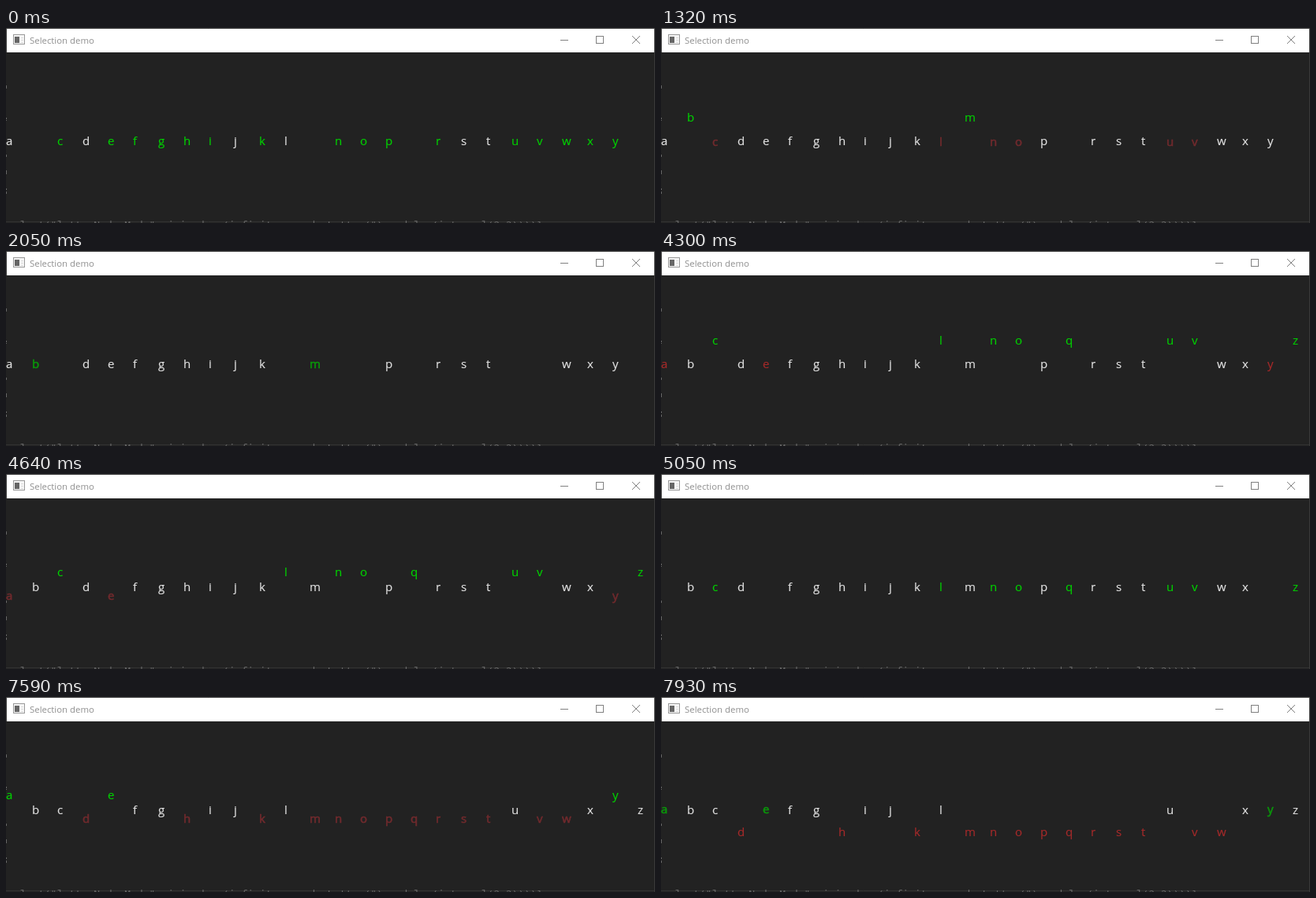
An HTML page for the animation above (7.99 s loop, 823x248 px).

```html
<!DOCTYPE html>
<html lang="en">
<head>
<meta charset="utf-8">
<title>Selection demo</title>
<style>
  html, body { margin: 0; width: 100%; height: 100%; overflow: hidden; background: #222; }
  svg { display: block; width: 823px; height: 248px; }
  text { white-space: pre; }
  #title { font: 11.4px "Open Sans", sans-serif; fill: #8f8f8f; }
  #letters { font: 15px "Open Sans", sans-serif; }
  #code { font: 13px "Noto Sans Mono", monospace; fill: #686868; }
</style>
</head>
<body>
<svg viewBox="0 0 823 248" xmlns="http://www.w3.org/2000/svg">
  <rect width="823" height="248" fill="#222"/>
  <path d="M0 246.5H823" stroke="#333"/>
  <text id="code" x="2" y="255">select("letterNode.Mode", joined = (infinite, randomLetter("), .delay(interval(2,3))))]</text>
  <path d="M.5 73v4M.5 114v2M.5 117v1M.5 161v3M.5 181v5M.5 204v2M.5 208v3" stroke="#666"/>
  <rect x="1" y="1" width="821" height="30" fill="#fff"/>
  <path d="M0 .5H823M.5 0V31M822.5 0V248" stroke="#3a3a3a"/>
  <g fill="none" stroke="#999">
    <rect x="9.5" y="8.5" width="14" height="12" fill="#f6f6f6"/>
    <path d="M19 12.5h3M19 15.5h3M19 18.5h3" stroke="#ddd"/>
    <rect x="11" y="11" width="6" height="8" fill="#666" stroke="none"/>
  </g>
  <text id="title" x="30" y="20">Selection demo</text>
  <g fill="none" stroke="#808080">
    <path d="M703 15.5h10"/>
    <rect x="748.5" y="10.5" width="9" height="9"/>
    <path d="M794 10l10 10M804 10l-10 10"/>
  </g>
  <g id="letters"></g>
</svg>
<script>
const LOOP = 7990, LEFT = 1, REST = 149, STEP = 32;
const ALPHABET = [..."abcdefghijklmnopqrstuvwxyz"];
const WHITE = "#e2e2e2", GREEN = "#00d000", BROWN = "#a52a2a";
const SOFT = { [GREEN]: "#0a960a", [BROWN]: "#702a2d" };

const first = { stay: "adjlst", fresh: "cefghiknopruvwxy" };
const updates = [
  { at: 1320, length: 730, enter: "bm", exit: "clnouv", stay: "adefghijkprstwxy", shift: 0.5, settle: -0.5 },
  { at: 4300, length: 750, enter: "clnoquvz", exit: "aey", stay: "bdfghijkmprstwx", shift: 0, settle: 0 },
  { at: 7250, length: 750, enter: "aey", exit: "dhkmnopqrstvw", stay: "bcfgijluxz", shift: 0, settle: -0.5 }
];

const group = document.getElementById("letters");
const nodes = ALPHABET.map((ch, i) => {
  const node = document.createElementNS("http://www.w3.org/2000/svg", "text");
  node.textContent = ch;
  node.setAttribute("x", LEFT + i * STEP - (i ? 0 : 1));
  return group.appendChild(node);
});

const ease = p => p < 0.5 ? 4 * p ** 3 : 1 - 4 * (1 - p) ** 3;

// A letter resting between two pixel rows looks heavier and dimmer.
function place(node, fill, dy) {
  const part = dy - Math.floor(dy);
  const soft = part > 0.3 && part < 0.7;
  const color = soft ? SOFT[fill] : fill;
  node.style.display = "";
  node.setAttribute("y", REST + Math.round(dy));
  node.setAttribute("fill", color);
  node.setAttribute("stroke", color);
  node.setAttribute("stroke-width", soft ? 0.6 : 0.15);
}

function hide(node) {
  node.style.display = "none";
}

function render(t) {
  const step = updates.filter(u => t >= u.at).pop();
  nodes.forEach((node, i) => {
    const ch = ALPHABET[i];
    if (!step) {
      if (first.stay.includes(ch)) place(node, WHITE, 0);
      else if (first.fresh.includes(ch)) place(node, GREEN, 0);
      else hide(node);
      return;
    }
    const p = Math.min(1, (t - step.at) / step.length);
    const k = ease(p);
    if (step.stay.includes(ch)) place(node, WHITE, 0);
    else if (step.enter.includes(ch)) place(node, GREEN, p < 1 ? -30 + 29.5 * k : step.settle);
    else if (step.exit.includes(ch) && p < 1) place(node, BROWN, step.shift + 28 * k);
    else hide(node);
  });
}

const start = performance.now();
function tick() {
  render((performance.now() - start) % LOOP);
  requestAnimationFrame(tick);
}
tick();
</script>
</body>
</html>
```
